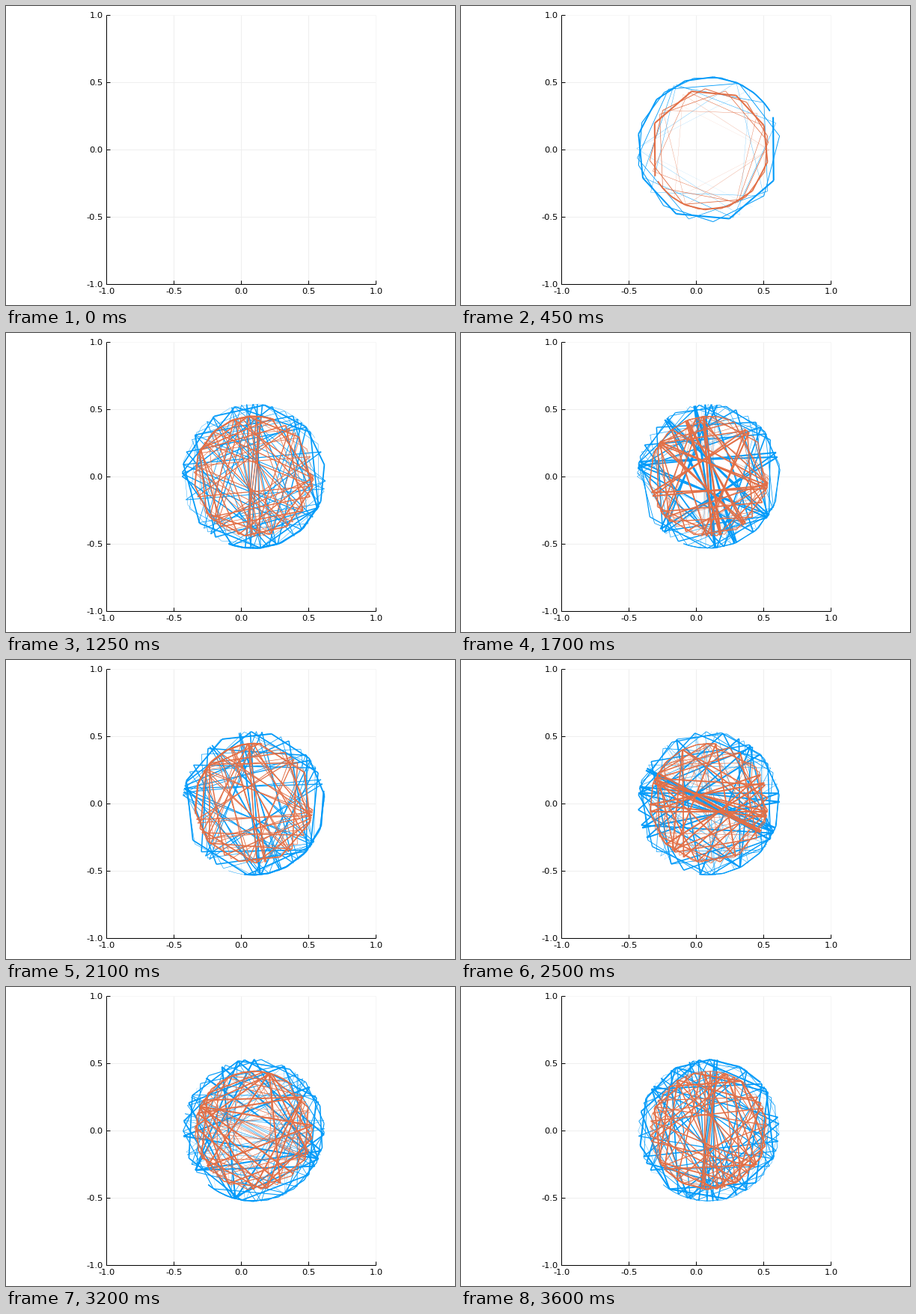
Animation, 600 px wide and 400 px high, one loop 3650 ms. Source, as a matplotlib script:

```python
import numpy as np
import matplotlib.pyplot as plt
from matplotlib.animation import FuncAnimation
from matplotlib.collections import LineCollection

W, H, DPI = 600, 400, 100
FRAMES, INTERVAL = 73, 50
STEP, TAIL = 5, 100          # samples per frame, length of the trail
BLUE, ORANGE = "#009AF9", "#E26F46"
PX = 72 / DPI                # one pixel in points
MAX_WIDTH = 2.1 * PX
LEFT, RIGHT, TOP, BOTTOM = 134.2, 494.2, 11.7, 371.7
TICKS = (-1.0, -0.5, 0.0, 0.5, 1.0)

fig = plt.figure(figsize=(W / DPI, H / DPI), dpi=DPI, facecolor="white")
ax = fig.add_axes([0, 0, 1, 1])
ax.set_xlim(0, W)
ax.set_ylim(H, 0)
ax.axis("off")


def to_x(v):
    return LEFT + (v + 1) / 2 * (RIGHT - LEFT)


def to_y(v):
    return BOTTOM - (v + 1) / 2 * (BOTTOM - TOP)


def line(xs, ys, color, width, z):
    ax.plot(xs, ys, color=color, lw=width * PX, zorder=z,
            solid_capstyle="butt")


def draw_axes():
    for v in TICKS:
        x, y = to_x(v), to_y(v)
        grid = "#f6f6f6" if v == 1 else "#eeeeee"
        line([x, x], [TOP, BOTTOM], grid, 1, 1)
        line([LEFT, RIGHT], [y, y], grid, 1, 1)
        line([x, x], [BOTTOM, BOTTOM - 4.5], "black", 1, 5)
        line([LEFT, LEFT + 4.5], [y, y], "black", 1, 5)
        style = dict(family="DejaVu Sans", fontsize=11.5 * PX, va="baseline",
                     color="black")
        ax.text(x + 0.3, 385, f"{v:.1f}", ha="center", **style)
        ax.text(129.5, y + 4.3, f"{v:.1f}", ha="right", **style)
    line([LEFT, LEFT], [TOP, BOTTOM + 0.5], "black", 1, 5)
    line([LEFT, RIGHT], [BOTTOM, BOTTOM], "black", 1, 5)


def orbit(n):
    """Offset of the outer body from the centre of mass at sample n.

    Each sample turns by about half a revolution at n = 75.5, and the turn
    grows steadily as the bodies spiral inwards.
    """
    u = n - 75.489
    chirp = 4.1512 * u**2 / 2 + 0.001216 * u**3 / 6 + 2.93e-6 * u**4 / 24
    angle = np.radians(82.6 + 180 * (n - 76) + chirp)
    shrink = 1 - 0.026 * n / 360
    return shrink * np.array([0.535 * np.cos(angle), 0.54 * np.sin(angle)])


def segments(offset):
    pts = np.column_stack([to_x(0.094 + offset[0]), to_y(offset[1])])
    return np.stack([pts[:-1], pts[1:]], axis=1)


draw_axes()
trails = []
for color, scale, z in ((BLUE, 1.0, 3), (ORANGE, -0.835, 4)):
    trail = LineCollection([], colors=color, zorder=z, capstyle="butt")
    ax.add_collection(trail)
    trails.append((trail, scale))


def update(frame):
    head = STEP * frame
    n = np.arange(max(0, head - TAIL), head + 1, dtype=float)
    offset = orbit(n)
    for trail, scale in trails:
        trail.set_segments(segments(scale * offset) if frame else [])
        trail.set_linewidths(np.linspace(0.05, MAX_WIDTH, max(1, len(n) - 1)))
    return [trail for trail, _ in trails]


anim = FuncAnimation(fig, update, frames=FRAMES, interval=INTERVAL,
                     repeat=True, repeat_delay=0, blit=False)
plt.show()
```
